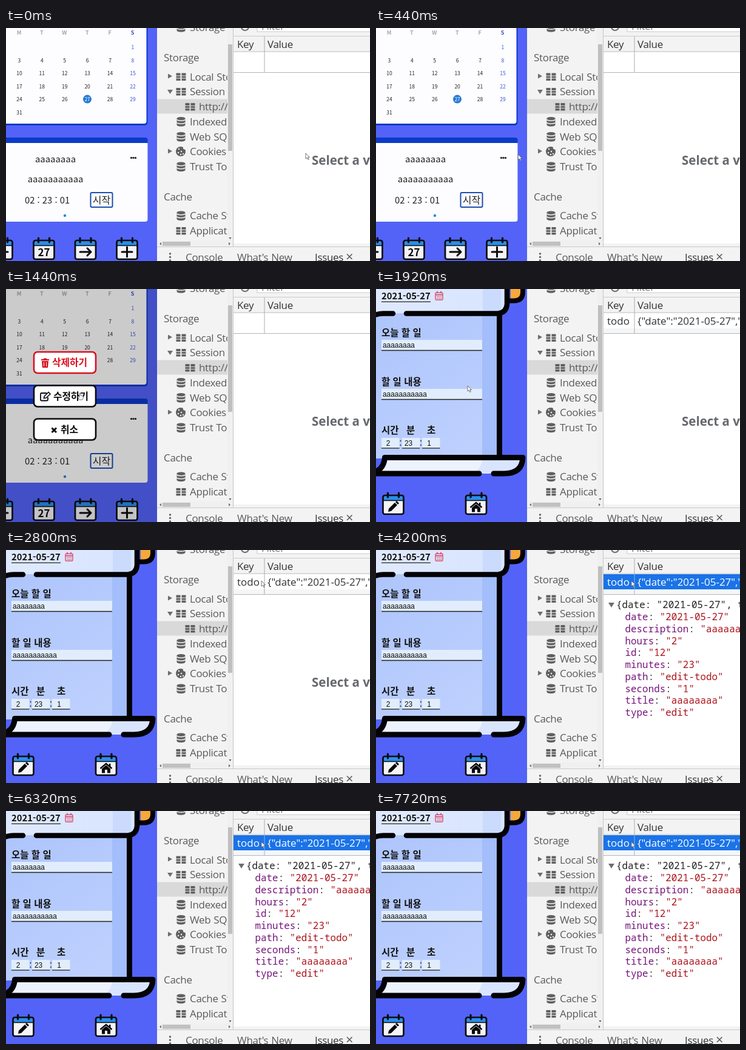
Write an HTML page that moves like this. It is 600x385 px and loops after 7.76 s.

```html
<!DOCTYPE html>
<html lang="ko">
<head>
<meta charset="utf-8">
<title>Todo edit with storage panel</title>
<style>
html, body { margin: 0; width: 100%; height: 100%; overflow: hidden; }
svg { display: block; width: 600px; height: 385px; }
text { white-space: pre; }
.kr { font-family: "Noto Sans CJK KR", "Noto Sans CJK", sans-serif; }
.ui { font: 17px "Open Sans", sans-serif; letter-spacing: -.32px; word-spacing: .8px; }
.wide { letter-spacing: 0; }
.mono { font: 500 15.9px "Noto Sans Mono", monospace; }
.field { font: 11.9px "Liberation Sans", Arial, sans-serif; fill: #111; }
.mid { text-anchor: middle; }
</style>
</head>
<body>
<svg id="stage" viewBox="0 0 600 385">
  <defs>
    <clipPath id="left"><rect width="249" height="385"/></clipPath>
    <clipPath id="tree"><rect x="249" width="116" height="351"/></clipPath>
    <linearGradient id="paper" x1="0" y1="0" x2=".6" y2="1">
      <stop offset="0" stop-color="#aec5fc"/><stop offset="1" stop-color="#bdd0fe"/>
    </linearGradient>
    <linearGradient id="roll" x1="0" y1="0" x2="1" y2="0">
      <stop offset="0" stop-color="#dfe9fe"/><stop offset="1" stop-color="#d8e5fe"/>
    </linearGradient>
    <g id="cal">
      <rect x="-17" y="-14" width="34" height="31" rx="3" fill="#f4f4f6"/>
      <path d="M-17-6V-11a3 3 0 0 1 3-3H14a3 3 0 0 1 3 3V-6Z" fill="#2b8eea"/>
      <rect x="-17" y="-14" width="34" height="31" rx="3" fill="none" stroke="#0b0b0d" stroke-width="2.700"/>
      <path d="M-17-5.5H17" stroke="#0b0b0d" stroke-width="1.700"/>
      <path d="M-9-18V-11M9-18V-11" stroke="#0b0b0d" stroke-width="3.200" stroke-linecap="round"/>
    </g>
    <g id="db">
      <path d="M-7-5V5.5C-7 9 7 9 7 5.5V-5C7-8.5-7-8.5-7-5Z" fill="#606060"/>
      <path d="M-7-3.2C-5-.6 5-.6 7-3.2M-7 1.8C-5 4.4 5 4.4 7 1.8" fill="none" stroke="#f3f3f3" stroke-width="1.4"/>
    </g>
    <path id="grid" d="M-8-6H-1V-2H-8ZM1-6H8V-2H1ZM-8-1H-1V2H-8ZM1-1H8V2H1ZM-8 3H-1V6.500H-8ZM1 3H8V6.500H1Z" fill="#606060"/>
  </defs>
  <g clip-path="url(#left)">
    <rect width="249" height="385" fill="#5363f7"/>
    <g id="home"></g>
    <g id="menu"></g>
    <g id="edit"></g>
  </g>
  <g id="tools"></g>
  <g id="empty"></g>
  <g id="row"></g>
  <g id="json"></g>
  <g id="arrow"><path d="M0 0V9L2.200 7.200 3.800 10.600 5.300 9.900 3.700 6.600H6.500Z" fill="#fff" stroke="#555" stroke-width=".8"/></g>
  <g id="hand"><path d="M0 0C1.500-1 2 0 2 4L6 5C7 6 6 9 5 11H0L-3 6C-2 5-1 6 0 7Z" fill="#fff" stroke="#555" stroke-width=".8"/></g>
</svg>
<script>
const LOOP = 7760, OPEN = 600, NEXT = 1720, PICK = 3040;
const $ = id => document.getElementById(id);

const rect = (x, y, w, h, fill, more = '') =>
  `<rect x="${x}" y="${y}" width="${w}" height="${h}" fill="${fill}" ${more}/>`;
const line = (d, color, w = 1, more = '') =>
  `<path d="${d}" fill="none" stroke="${color}" stroke-width="${w}" ${more}/>`;
const dot = (x, y, r, fill) => `<circle cx="${x}" cy="${y}" r="${r}" fill="${fill}"/>`;
const use = (id, x, y) => `<use href="#${id}" x="${x}" y="${y}"/>`;
const text = (s, x, y, cls, fill, more = '') =>
  `<text x="${x}" y="${y}" class="${cls}" fill="${fill}" ${more}>${s}</text>`;
const kr = (s, x, y, size, weight = 400, fill = '#111', cls = '') =>
  text(s, x, y, 'kr ' + cls, fill, `font-size="${size}" font-weight="${weight}"`);
const ui = (s, x, y, fill = '#5a5a5a') => text(s, x, y, 'ui', fill);

function drawHome() {
  let out = rect(-10, -10, 243.500, 171, '#0b3ac9', 'rx="5"') + rect(-10, -10, 241.500, 168, '#fdfdff', 'rx="4"');
  const colX = c => 21.500 + c * 37.400, rowY = r => 35 + r * 21.500;
  [...'MTWTFS'].forEach((d, c) => {
    out += kr(d, colX(c), 11.300, 9, 700, c == 5 ? '#3a52d8' : '#a3a7ad', 'mid');
  });
  out += dot(134, 117.600, 7, '#2479d4');
  for (let day = 1; day <= 31; day++) {
    const slot = day + 5, c = slot % 7 - 1, r = Math.floor(slot / 7);
    if (c < 0) continue;
    const color = day == 27 ? '#fff' : c == 5 ? '#3a52d8' : '#222';
    out += kr(day, colX(c) + .4, rowY(r), 8.500, 500, color, 'mid');
  }
  out += rect(-10, 181, 243.500, 139, '#0b3ac9', 'rx="4"') +
    `<path d="M0 190H233.500V316a4 4 0 0 1-4 4H0Z" fill="#fdfdff"/>` +
    kr('aaaaaaaa', 81.500, 221.500, 14.900, 400, '#222', 'mid') +
    kr('aaaaaaaaaaa', 81.500, 255, 14.800, 400, '#222', 'mid') +
    kr('02 : 23 : 01', 31, 290, 14.800, 400, '#222') +
    rect(139.500, 272, 36, 24, '#fdfdff', 'rx="2" stroke="#1c4fae" stroke-width="2"') +
    kr('시작', 157.500, 290, 16, 400, '#222', 'mid') + dot(97, 310, 2.200, '#2a86e0');
  for (const x of [206.500, 210, 213.500]) out += dot(x, 214.500, 1.600, '#111');
  for (const x of [-6.500, 62.500, 131, 199.500]) out += use('cal', x, 365);
  const mark = d => line(d, '#0b0b0d', 3, 'stroke-linejoin="round" stroke-linecap="round"');
  out += kr('27', 62.500, 376.500, 17, 700, '#0b0b0d', 'mid') +
    mark('M122 370H140M134 364L140 370 134 376') +
    mark('M3 370H-15M-9 364L-15 370-9 376') +
    mark('M191 370H208M199.500 362V378');
  $('home').innerHTML = out;
}

function drawMenu() {
  const button = (y, color, label, x) =>
    rect(46, y, 102, 35, '#fff', `rx="6" stroke="${color}" stroke-width="2.600"`) +
    kr(label, x, y + 23, 15.800, 700, color);
  const red = '#d9101f', ink = '#0b0b0d';
  $('menu').innerHTML = rect(0, 0, 249, 385, '#000', 'opacity=".2"') +
    button(104, red, '삭제하기', 76) + button(159.500, ink, '수정하기', 78) + button(214.500, ink, '취소', 90) +
    line('M58 117H71M62 115.500H67', red, 2) +
    `<path d="M59 119H70L69 130H60Z" fill="${red}"/>` + line('M62.500 121V128M66.500 121V128', '#fff') +
    line('M67 172H58.500Q57 172 57 173.500V183Q57 184.500 58.500 184.500H67.500Q69 184.500 69 183V179', ink, 1.800) +
    line('M62.500 180.500L63 177.500 70 170.500 73 173.500 66 180Z', ink, 1.600) +
    line('M75.500 229.500L83 237M83 229.500L75.500 237', ink, 3);
}

function drawEdit() {
  const ink = '#030306', round = 'stroke-linecap="round" stroke-linejoin="round"';
  const field = (x, y, w, h) => rect(x, y, w, h, '#e1edfc') + line(`M${x} ${y + h}h${w}`, '#222', 1.300);
  const label = (s, x, y) => kr(s, x, y, 15.500, 700);
  let out = rect(0, 40, 202, 240, 'url(#paper)') + rect(175, 44, 26, 232, '#a4bdfb') +
    `<path d="M222 -4V17H227Q241 17 241 4V-4Z" fill="#f8a83a"/>` +
    line('M216 19.500H227Q242 19.500 242 5V-4', ink, 8) +
    `<path d="M0 0H215V28Q214 40 201 40H0Z" fill="url(#roll)"/>` +
    rect(176, 0, 30, 37, '#cbdbfe') +
    line('M-4 44Q3 40.500 12 40.500H28M50 40.500H201Q215 39 216 25V-4', ink, 8.500, round) +
    line('M203.500 42V276', ink, 9) +
    `<path d="M15 279H242Q240 305 211 305H0V300Q14 293 15 279Z" fill="#ecf2fe"/>` +
    `<path d="M176 279H242Q240 305 211 305H160Q174 297 176 279Z" fill="#d9e5fe"/>` +
    line('M-4 303Q13 298 14.500 278.500H242Q241 305 211 305H194M170 305H-5', ink, 9, round);
  const pink = '#dc5273';
  out += kr('2021-05-27', 9, 17, 14.800, 700) + line('M9 21.200H90', '#222', 1.300) +
    rect(98, 6, 12, 12, 'none', `rx="1.500" stroke="${pink}" stroke-width="1.500"`) +
    line('M98 9.500H110', pink, 2) + line('M101 3.500V7M107 3.500V7', pink, 1.800) +
    line('M100.500 12.500H108M100.500 15.500H108', pink, 1.600, 'stroke-dasharray="1.800 1.100"');
  out += label('오늘 할 일', 9, 78) + field(9, 84, 166, 17.500) + text('aaaaaaaa', 11, 96.500, 'field') +
    label('할 일 내용', 9, 158.500) + field(9, 165, 166, 17.500) + text('aaaaaaaaaaa', 11, 177.500, 'field') +
    label('시간', 9, 239) + label('분', 50, 239) + label('초', 84, 239);
  [[9, '2', 20], [43, '23', 53.500], [76, '1', 87.500]].forEach(([x, s, tx]) => {
    out += field(x, 246, 29.500, 17) + text(s, tx, 258.500, 'field mid');
  });
  out += kr(':', 40.500, 259.500, 14, 500, '#111', 'mid') + kr(':', 74, 259.500, 14, 500, '#111', 'mid');
  out += use('cal', 28.500, 355) + use('cal', 165, 355) +
    `<path d="M20 368L21 363 31 353 35 357 25 367Z" fill="${ink}"/><path d="M32 352L34 350 38 354 36 356Z" fill="${ink}"/>` +
    line('M155.500 361L165 353 174.500 361', ink, 2.400) +
    `<path d="M158 361.500L165 355.500 172 361.500V368.500H167V363H163V368.500H158Z" fill="${ink}"/>` +
    rect(170, 353, 2.400, 5, ink);
  $('edit').innerHTML = out;
}

function drawTools() {
  const gray = '#f3f3f3', rule = '#cacaca';
  const tri = (d, fill = '#6e6e6e') => `<path d="${d}" fill="${fill}"/>`;
  let tree = rect(249, 117.500, 116, 24, '#d9d9da') + ui('Storage', 260, 55) + ui('Cache', 260, 285);
  const items = [
    ['db', 'Storage', 4.500], ['grid', 'Local Storage', 86.500], ['grid', 'Session Storage', 111],
    ['grid', 'http://localhost', 136, 15], ['db', 'IndexedDB', 160.500], ['db', 'Web SQL', 185.500],
    ['', 'Cookies', 210], ['db', 'Trust Tokens', 235], ['db', 'Cache Storage', 316], ['grid', 'Application Cache', 341]
  ];
  for (const [icon, name, y, dx = 0] of items)
    tree += (icon ? use(icon, 288.500 + dx, y - 6) : '') + ui(name, 303 + dx, y);
  tree += dot(288, 204, 8, '#606060') + dot(295, 197.500, 3.200, gray);
  for (const [x, y] of [[285, 200], [284, 206], [289, 204], [292, 208], [288, 209]]) tree += dot(x, y, 1.200, gray);
  tree += tri('M267 75.500L274 79.500 267 83.500Z') + tri('M267 199.500L274 203.500 267 207.500Z') + tri('M266 102L275 102 270.500 109Z');

  let out = rect(249, 0, 351, 385, gray) + `<g clip-path="url(#tree)">${tree}</g>` +
    rect(365, 0, 9, 351, '#f0f0f0') + rect(366, 27, 7, 176, '#bfbfbf') +
    rect(250, 351, 124, 10, '#f0f0f0') + rect(258, 353, 46, 7, '#c1c1c1') +
    tri('M256 354V359L253 356.500Z') + tri('M367.500 346H371.500L369.500 349Z', '#555') + tri('M367 354V359L370 356.500Z') +
    rect(375, 14, 225, 342, '#fff') + line('M374.500 0V361', '#c4c4c4') +
    rect(414, -4, 190, 10, '#fff', `stroke="${rule}"`) + ui('Filter', 421, 2.500, '#757575') +
    line('M388 -2A6 6 0 0 0 400 -2', '#6e6e6e', 2) +
    line('M375 13.500H600', rule) + rect(375, 14, 225, 24, gray) +
    ui('Key', 381, 32.500, '#333') + ui('Value', 431, 32.500, '#333') +
    line('M375 39H600M375 73.500H600', '#b5b5b5') + line('M426 14V73', '#aaa') +
    line('M249 361.500H600', rule);
  for (const y of [373, 378.500, 384]) out += dot(270.500, y, 1.700, '#5f6368');
  out += ui('Console', 296, 384.500) + ui("What's New", 381, 384.500) + ui('Issues', 509, 384.500, '#333') +
    line('M562 373.500L570.500 382M570.500 373.500L562 382', '#5a5a5a', 1.600);
  $('tools').innerHTML = out;
  $('empty').innerHTML = text('Select a value to preview', 504, 226, 'ui', '#66696e',
    'style="font-size:20.500px;font-weight:700;letter-spacing:0;word-spacing:0"');
}

function drawRow(picked) {
  const ink = picked ? '#fff' : '#333';
  $('row').innerHTML = rect(375, 40, 225, 25, picked ? '#1a73e8' : '#fff') + rect(375, 65, 225, 8, '#f5f6f8') +
    line('M426 40V73', picked ? '#8fb4ea' : '#aaa') + text('todo', 381, 58.500, 'ui wide', ink) +
    text('{"date":"2021-05-27","description"', 431, 58.500, 'ui wide', ink);
}

function drawJson() {
  const pairs = {
    date: '2021-05-27', description: 'aaaaaaaaaaa', hours: 2, id: 12, minutes: 23,
    path: 'edit-todo', seconds: 1, title: 'aaaaaaaa', type: 'edit'
  };
  let out = `<path d="M383 87H393L388 95Z" fill="#6e6e6e"/>` +
    text('{date: "2021-05-27", title', 396, 96, 'mono', '#222');
  Object.entries(pairs).forEach(([key, value], i) => {
    const body = `<tspan fill="#76157c">${key}</tspan><tspan fill="#333">: </tspan>"${value}"`;
    out += text(body, 410.500, 116 + i * 19.750, 'mono', '#ac141c');
  });
  $('json').innerHTML = out;
}

// Pointer stops: time, x, y
const stops = [[0, 494, 207], [80, 494, 207], [520, 210, 209], [900, 211, 209], [1320, 121, 172],
  [1780, 121, 172], [2500, 421, 51], [LOOP, 421, 51]];

function pointer(t) {
  const i = stops.findIndex(s => s[0] > t);
  const [t0, x0, y0] = stops[i - 1], [t1, x1, y1] = stops[i];
  const p = (t - t0) / (t1 - t0), e = p * p * (3 - 2 * p);
  return [x0 + (x1 - x0) * e, y0 + (y1 - y0) * e];
}

const show = (id, on) => $(id).setAttribute('visibility', on ? 'visible' : 'hidden');
let lastPicked;

function frame() {
  const t = performance.now() % LOOP;
  const editing = t >= NEXT, picked = t >= PICK;
  show('home', !editing);
  show('menu', t >= OPEN && !editing);
  show('edit', editing);
  show('row', editing);
  show('empty', !picked);
  show('json', picked);
  if (picked !== lastPicked) drawRow(lastPicked = picked);
  const [x, y] = pointer(t), hover = t > 1240 && t < NEXT;
  show('hand', hover);
  show('arrow', !hover);
  for (const id of ['hand', 'arrow']) $(id).setAttribute('transform', `translate(${x} ${y})`);
  requestAnimationFrame(frame);
}

drawHome();
drawMenu();
drawEdit();
drawTools();
drawJson();
frame();
</script>
</body>
</html>
```
